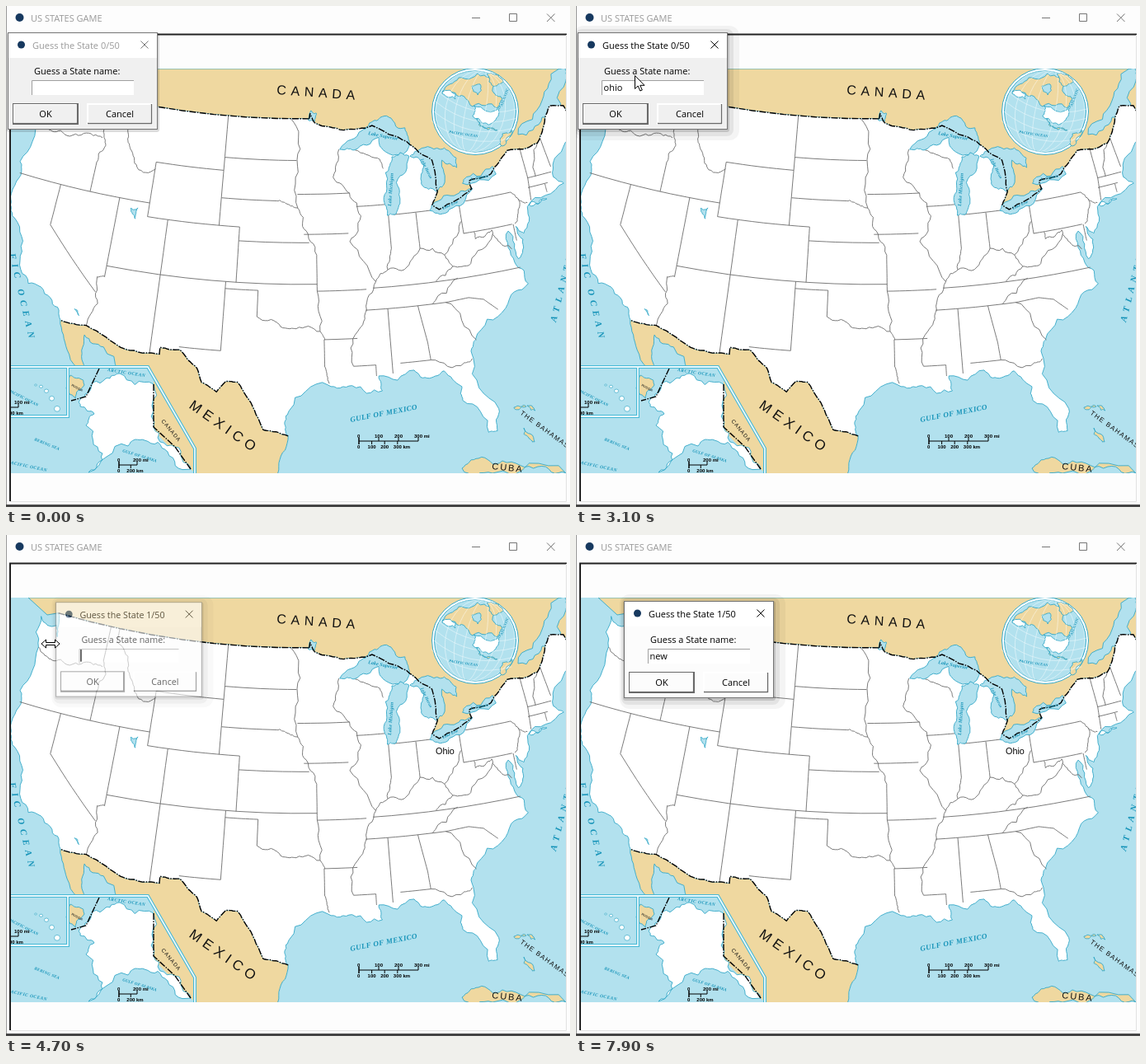
Write an HTML page that moves like this. It is 684 px wide and 608 px high and loops after 8 s.

```html
<!DOCTYPE html>
<html lang="en">
<head>
<meta charset="utf-8">
<title>US States Game</title>
<style>
html, body { margin: 0; width: 100%; height: 100%; overflow: hidden; background: #fff; }
svg { display: block; width: 684px; height: 608px; }
text { white-space: pre; }
.ui { font: 11px "Open Sans", "Noto Sans", sans-serif; }
.sea { font-family: "Liberation Serif", serif; font-style: italic; font-weight: bold; fill: #1593b8; }
.land { font-family: "Liberation Sans", sans-serif; fill: #111; }
.bar { font: bold 6px "Liberation Sans", sans-serif; }
.line { fill: none; stroke: #6d6d6d; stroke-width: .9; stroke-linejoin: round; }
.coast { fill: none; stroke: #35a9c8; stroke-width: .9; }
.frontier { fill: none; stroke: #000; stroke-width: 1.4; stroke-dasharray: 8 1.5 1.5 1.5; }
</style>
</head>
<body>
<svg id="stage" viewBox="0 0 684 608"></svg>
<script>
const WATER = "#b2e1ee", TAN = "#efd8a0", WHITE = "#fff";

let seed = 7;
const random = () => (seed = (seed * 16807) % 2147483647) / 2147483647 - .5;

// Albers equal-area conic: degrees west and north to stage pixels.
const RAD = Math.PI / 180, [SOUTH, NORTH] = [29.5 * RAD, 45.5 * RAD];
const CONE = (Math.sin(SOUTH) + Math.sin(NORTH)) / 2;
const CURVE = Math.cos(SOUTH) ** 2 + 2 * CONE * Math.sin(SOUTH);
function project([west, lat]) {
  const radius = 956 * Math.sqrt(CURVE - 2 * CONE * Math.sin(lat * RAD)) / CONE;
  const turn = CONE * (96 - west) * RAD;
  return [358.8 + radius * Math.sin(turn), -916.5 + radius * Math.cos(turn)];
}

// Midpoint displacement turns a few key points into a natural line.
function rough(text, amount = .35, levels = 3) {
  let points = text.trim().split(/\s+/).map(p => p.split(",").map(Number));
  while (levels--) {
    points = points.flatMap(([bx, by], i) => {
      if (!i) return [[bx, by]];
      const [ax, ay] = points[i - 1], push = random() * amount;
      return [[(ax + bx) / 2 - (by - ay) * push, (ay + by) / 2 + (bx - ax) * push], [bx, by]];
    });
  }
  return points;
}

const join = points => points.map(p => p.map(v => v.toFixed(1)).join()).join(" ");
const geo = (text, amount) => join(rough(text, amount).map(project));
const closed = text => text + " " + text.split(" ")[0];
const open = (points, cls) => `<polyline points="${points}" class="${cls}"/>`;
const area = (points, fill, stroke = "none") =>
  `<polygon points="${points}" fill="${fill}" stroke="${stroke}" stroke-width=".9"/>`;
const lake = text => area(geo(closed(text)), WATER, "#35a9c8");
const island = (text, fill = TAN) => area(join(rough(closed(text), .5)), fill, "#35a9c8");
const rect = (x, y, w, h, fill, extra = "") =>
  `<rect x="${x}" y="${y}" width="${w}" height="${h}" fill="${fill}" ${extra}/>`;
const label = (cls, text, x, y, turn, size, gap = 0) =>
  `<text class="${cls}" font-size="${size}" letter-spacing="${gap}" transform="translate(${x} ${y}) rotate(${turn})">${text}</text>`;

function scaleBar(x, y, width, ticks, step) {
  let out = `<path d="M${x} ${y}h${width}M${x} ${y - 4}v8" stroke="#000" fill="none"/>`;
  for (let i = 0; i <= ticks; i++) {
    for (const [unit, ratio, side, drop] of [["mi", 1, -4, -4], ["km", .65, 4, 9]]) {
      const at = x + width * ratio * i / ticks;
      out += `<path d="M${at} ${y}v${side}" stroke="#000"/>` +
        `<text class="bar" x="${at - (i ? 5 : 2)}" y="${y + drop}">${i * step}${i === ticks ? " " + unit : ""}</text>`;
    }
  }
  return out;
}

// Key points of shores and frontiers, in degrees west and north.
const outline = {
  parallel49: geo("123,49 95.2,49", 0),
  north: geo("95.2,49 95.1,49.4 94.6,48.7 91.5,48.1 88.4,48.3 84.9,46.9 82.5,45.3 82.4,43 83.1,42.1 82.5,41.7 79,42.8 79.1,43.4 76.8,43.6 74.7,45 71.5,45 70.3,46.2 69.2,47.4 67.8,47.1 67,44.8", .12),
  east: geo("67,44.8 70.2,43.6 70.8,42.3 70,41.7 74,40.7 74.9,38.9 75.5,39.5 75.1,38.5 75.9,37.2 76.3,39.3 76.3,37 75.5,35.3 77.9,33.9 81,32 81.4,30.7 80,26.8 80.4,25.2"),
  gulf: geo("80.4,25.2 81.1,25.2 82.8,27.8 82.7,28.8 84,30.1 85.3,29.7 86.5,30.4 89.5,30.2 89.3,29.1 91.8,29.6 93.8,29.7 97,27.9 97.4,27 97.1,26"),
  south: geo("97.1,26 99.1,26.4 100.4,28.6 101.4,29.8 102.4,29.8 103.1,29 104.4,29.6 104.9,30.6 106.5,31.8 108.2,31.8 108.2,31.3 111.1,31.3 114.8,32.5 117.1,32.5", .1),
  west: geo("117.1,32.5 118.4,33.9 120.6,34.5 121.9,36.6 123.7,38.9 124.4,40.4 124.1,41.7 124.5,42.8 124,46.2 124.7,48.4 122.8,48.1 122.4,47.3 123,49")
};

// Surveyed borders follow meridians and parallels; the projection bends them.
const parallels = [
  [42, 124.2, 111.05], [45, 111.05, 104.05], [41, 111.05, 102.05], [37, 114.05, 94.6], [36.5, 103, 100],
  [32, 106.6, 103], [45.95, 104.05, 96.55], [43, 104.05, 98.5], [40, 102.05, 95.3], [43.5, 96.45, 91.2],
  [40.6, 95.8, 91.5], [36.5, 94.6, 90.1], [33, 94.05, 91.15], [31, 91.6, 89.7], [42.5, 90.6, 87.8],
  [41.72, 87, 83.4], [39.72, 80.5, 75.8], [42, 79.8, 75.3], [42.73, 73.3, 70.9], [42.04, 73.5, 71.5],
  [36.56, 89.5, 75.9], [35, 90.3, 83.1], [31, 87.6, 85]
];
const meridians = [
  [120, 42, 39], [117.03, 49, 46.4], [117.03, 44.2, 42], [116.05, 49, 48], [114.05, 42, 36.2], [111.05, 45, 41],
  [109.05, 41, 31.33], [104.05, 49, 41], [103, 37, 32], [102.05, 41, 37], [100, 36.5, 34.6], [94.6, 39.1, 36.5],
  [94.05, 33, 31], [89.7, 31, 30.2], [88.3, 35, 30.3], [87.5, 41.7, 39.3], [84.8, 41.7, 39.1], [80.5, 42, 39.7],
  [75.7, 39.7, 38.5], [71.8, 42, 41.4]
];
const rivers = [
  "124,46.2 122.8,45.7 121.2,45.7 119,46 117,46", "117,46.4 116.5,45.5 117,44.2",
  "116,48 114.4,46.6 113.9,45.6 112.9,44.4 111,44.5", "114,36.2 114.7,36.1 114.2,34.2 114.8,32.5",
  "97.2,49 96.5,46 96.4,42.5 95.8,41 94.6,39.1", "98.5,43 97.5,42.8 96.4,42.5", "94.6,36.5 94.4,33.6 94,33", "94,31 93.7,29.8",
  "100,34.6 98,34.1 96.5,33.8 94.4,33.6",
  "92.1,46.7 92.8,44.7 91.2,43.5 90.2,41.8 91.4,40 89.2,37 90.2,35 91.1,33.5 91.6,31",
  "90.4,46.6 88.1,45.9 87.6,45.1", "87.5,39.3 88,37.8",
  "89.2,37 88,37.8 86,38 84.8,39.1 82.6,38.4 80.6,40.6", "75.3,42 74.7,41.4 75,40.4 75.5,39.7", "74.7,41.4 73.9,41",
  "71.5,45 72.5,42.7", "79.5,39.7 79.5,39.2 77.8,39.6 77.2,38.5 76.3,38", "77.8,39.3 80.3,37.5 82,37.5 82.6,38.4",
  "82,37.5 83.7,36.6", "81.7,36.6 84.3,35", "83.1,35 80.9,32", "85,31 82.2,30.5 81.5,30.7"
];
const slants = [
  "120,39 114.6,35", "73.4,45 73.3,42.7 73.5,41.1", "71.1,45.3 70.8,43.1", "85.6,35 85.1,32.3 85,31",
  "83.1,35 81,35.1 79.7,34.8 78.6,33.9"
];
const lakes = [
  "92,46.7 89.5,48 88.3,48.6 86.5,48.8 84.9,47.9 84.7,46.5 87.5,46.5 87.8,47.4 90.5,46.6",
  "87.6,41.7 87.8,43 87.4,44.8 86.6,45.9 84.8,45.8 86.4,44 86.2,42.8 86.9,41.7",
  "84.7,45.8 83.4,45 83.9,43.7 82.5,43 81.7,43.4 81.5,45.2 80.1,44.5 80,45.2 81.5,46 84,46.1",
  "83.4,41.7 81.5,41.6 78.9,42.8 80.5,42.6 83.1,42.1", "79.8,43.3 76.3,43.5 76.5,44.1 79.3,43.7",
  "112.8,41.4 112.1,41.5 112.2,40.7", "95.3,48.9 95,49.6 94.4,49.4 94.6,48.8", "116.1,33.5 115.8,33.4 115.6,33.1"
];

function alaska() {
  let hawaii = "";
  for (let i = 0; i < 5; i++) {
    hawaii += `<ellipse cx="${36 + i * 6.5}" cy="${460 + i * i * 1.8}" rx="${1.5 + i * .5}" ry="${1 + i * .6}" fill="#fff" stroke="#35a9c8" stroke-width=".7"/>`;
  }
  const boxes = "M6 438H172L229 537V567M75 438V498H6";
  return area("75,438 172,438 229,537 229,567 6,567 6,498 75,498", WATER) +
    area("179,455 184,458 229,537 229,567 179,515", TAN) + island("78,448 95,460 84,476 78,472") +
    island("96,471 121,452 138,446 179,459 179,511 205,535 224,562 196,541 168,527 148,534 100,566 117,543 97,509 107,495 90,486", WHITE) +
    open("179,459 179,511 205,535 224,562", "frontier") + open("113,440 97,474 79,479", "frontier") +
    `<path d="${boxes}" fill="none" stroke="#48b9d6" stroke-width="4"/><path d="${boxes}" fill="none" stroke="#e9f8fb" stroke-width="1.8"/>` +
    hawaii +
    label("sea", "ARCTIC OCEAN", 123, 443, 9, 5.5, .5) + label("sea", "BERING SEA", 34, 527, 22, 5, .3) +
    label("sea", "GULF OF ALASKA", 141, 541, 17, 5, .1) + label("sea", "PACIFIC OCEAN", 2, 555, 12, 5.5, .5) +
    label("sea", "PACIFIC OCEAN", 3, 468, 27, 5, .1) +
    label("land", "CANADA", 188, 504, 50, 6.5, 1) + label("land", "RUSSIA", 79, 461, 28, 4) +
    scaleBar(137, 557, 22, 1, 200) + scaleBar(-12, 487, 27, 1, 100);
}

function globe() {
  let grid = "";
  for (let r = 12; r < 50; r += 12) {
    grid += `<ellipse rx="${r}" ry="50"/><path d="M-50 ${r - 26}Q0 ${r} 50 ${r - 26}"/>`;
  }
  return `<circle cx="569" cy="128" r="52.5" fill="#fff" stroke="#35a9c8"/>
    <circle cx="569" cy="128" r="49.5" fill="${WATER}" stroke="#35a9c8"/>` +
    island("529,104 549,87 580,84 592,106 602,112 596,124 566,122 546,108") + island("583,83 594,83 603,92 594,97") +
    island("565,97 575,95 572,108", WATER) + island("567,121 599,121 592,140 566,134", WHITE) +
    island("529,106 540,104 545,113", WHITE) + island("571,137 588,148 596,151 580,148") + island("602,155 614,151 602,170") +
    `<g transform="translate(569 128) rotate(12)" fill="none" stroke="#fff" stroke-width=".6" opacity=".7">${grid}</g>` +
    label("sea", "PACIFIC OCEAN", 537, 154, 9, 4.5, .1) + label("sea", "ATLANTIC", 602, 122, -70, 4.5, .1);
}

function map() {
  const { parallel49, north, east, gulf, south, west } = outline;
  const surveyed = [
    ...parallels.map(([lat, from, to]) => `${from},${lat} ${to},${lat}`),
    ...meridians.map(([lon, from, to]) => `${lon},${from} ${lon},${to}`), ...slants
  ];
  return rect(6, 76, 673, 491, WATER) +
    area(`${parallel49} ${north} 700,76 27,76 50,97`, TAN, "#35a9c8") +
    island("621,156 650,115 671,76 679,76 679,91 650,135", WATER) +
    area(`${south} ${geo("117.1,32.5 116,30.5 114,28 112,22 97.7,22 97.8,24 97.1,26", .2)}`, TAN, "#35a9c8") +
    lake("114.8,31.8 113,31.2 111,27.5 112.5,27.5 114.6,30") +
    area(Object.values(outline).join(" "), WHITE) +
    [east, gulf, west].map(p => open(p, "coast")).join("") +
    surveyed.map(p => open(geo(p, 0), "line")).join("") + rivers.map(p => open(geo(p), "line")).join("") +
    lakes.map(lake).join("") + island("634,241 656,234 646,240", WHITE) +
    [parallel49, north, south].map(p => open(p, "frontier")).join("") +
    label("land", "CANADA", 328, 107, 4, 16, 5.7) + label("land", "MEXICO", 221, 487, 35, 17, 5.4) +
    label("sea", "GULF OF MEXICO", 418, 505, -11, 9, .4) + label("sea", "ATLANTIC", 667, 384, -76, 11, 5.5) +
    label("sea", "FIC OCEAN", 4, 301, 77, 11, 5.7) + label("sea", "Lake Superior", 439, 156, 11, 6, .1) +
    label("sea", "Lake Michigan", 467, 243, -86, 6, .2) + label("sea", "Lake Huron", 503, 186, 65, 5, .1) +
    label("sea", "Lake Erie", 530, 247, -24, 5) + label("sea", "L. Ontario", 564, 212, -12, 5) +
    island("553,561 573,549 602,552 645,559 679,567 590,567") + island("628,512 641,529 634,524") +
    island("616,487 631,486 621,490") + island("632,485 642,491 636,490") +
    label("land", "THE BAHAMAS", 623, 495, 36, 8, 1.3) + label("land", "CUBA", 589, 562, 6, 11, 2) +
    scaleBar(428, 528, 72, 3, 100) + globe() + alaska();
}

// Tk-style raised button; the default one carries a dark frame.
function button(x, text, isDefault) {
  return `<g class="${isDefault ? "ok" : "cancel"}">` + rect(x, 85, 80, 26, isDefault ? "#686868" : "#fff") +
    (isDefault ? rect(x + 1, 86, 78, 24, "#fff") : "") +
    `<path class="bevel" d="M${x + 78.5} 86V109.5H${x + 1}" fill="none" stroke="#696969" stroke-width="1.4"/>` +
    rect(x + 2, 87, 75.5, 21.5, "var(--face)") +
    `<text class="ui face" x="${x + 40}" y="102" text-anchor="middle">${text}</text></g>`;
}

function dialog(id, x, y, title, face) {
  return `<g id="${id}" style="--face:${face}"><g transform="translate(${x} ${y})">
    <g class="shadow">${rect(-6, -9, 201, 139, "#000", 'rx="12" opacity=".045"')}${rect(-4, -5, 192, 130, "#000", 'rx="8" opacity=".07"')}</g>
    ${rect(-2, -1, 185, 121, "#000", 'rx="3" opacity=".14"')}
    ${rect(-.5, -.5, 181, 117, face, 'stroke="#747474"')}${rect(0, 0, 180, 30, "#fff")}
    <circle cx="15.5" cy="14" r="4.5" fill="#17395f"/>
    <text class="ui title" x="29" y="19">${title}</text>
    <path class="close" d="M160.5 9.5l9 9m0 -9l-9 9" stroke="#000"/>
    <text class="ui" x="31" y="50">Guess a State name:</text>
    ${rect(28, 57, 124, 18, "#fff")}<path d="M28.5 75V57.5H152" fill="none" stroke="#a0a0a0"/>
    <text class="ui entry" x="30.5" y="70"></text>${rect(29.5, 58, 2, 15, "#000", 'class="caret"')}
    ${button(5, "OK", true)}${button(95, "Cancel", false)}</g></g>`;
}

const stage = document.getElementById("stage");
stage.innerHTML = `<clipPath id="frame"><rect x="6" y="76" width="673" height="491"/></clipPath>
  ${rect(0, 0, 684, 608, "#fdfdfd")}${rect(0, 0, 1, 605, "#999")}
  <circle cx="16.5" cy="14" r="5" fill="#17395f"/>
  <text id="heading" class="ui" x="30" y="18.5">US STATES GAME</text>
  <path id="controls" fill="none" d="M565 14.5h10M610.5 9.5h9v9h-9zM656 9.5l9.5 9.5m0 -9.5l-9.5 9.5"/>
  <path d="M5 601V34.5H680" fill="none" stroke="#222" stroke-width="2"/>
  <path d="M679.5 35V601.5H5" fill="none" stroke="#e2e2e2"/>
  ${rect(0, 605, 684, 3, "#444")}
  <g clip-path="url(#frame)">${map()}</g>
  <path id="turtle" d="M347 321.5L337 316.5L339.5 321.5L337 326.5Z"/>
  <text id="answer" x="521" y="266" font-family="Liberation Sans, sans-serif" font-size="10.8">Ohio</text>
  ${dialog("first", 3, 33, "Guess the State 0/50", "#f0f0f0")}
  ${dialog("second", 59, 81, "Guess the State 1/50", "#fcfcfc")}
  <g id="pointer">
    <path class="arrow" d="M.5 .5V16.5L4.2 13L6.8 19L9.3 18L6.8 12.3H12Z" fill="#fff" stroke="#000"/>
    <path class="beam" d="M-3 -5h2l1 1l1 -1h2M0 -4V5M-3 6h2l1 -1l1 1h2" fill="none" stroke="#ddd"/>
    <path class="resize" d="M-11 0L-5.5 -5V-1.5H5.5V-5L11 0L5.5 5V1.5H-5.5V5Z" fill="#fff" stroke="#000"/>
  </g>`;

const $ = selector => stage.querySelector(selector);
const show = (node, on) => node.setAttribute("visibility", on ? "visible" : "hidden");
const clamp = v => Math.max(0, Math.min(1, v));
const within = (t, from, to) => t >= from && t < to;

const entries = {
  first: { word: "ohio", keys: [1500, 1800, 1800, 1900], blinkFrom: -200 },
  second: { word: "new", keys: [7400, 7500, 7600], blinkFrom: 4600 }
};
const strokes = [
  { kind: "beam", start: 100, end: 900, from: [66, 97], to: [66, 97] },
  { kind: "arrow", start: 2800, end: 3100, from: [71, 84], to: [71, 84] },
  { kind: "arrow", start: 3100, end: 3400, from: [71, 84], to: [54, 137] },
  { kind: "arrow", start: 3400, end: 4500, from: [54, 137], to: [54, 130] },
  { kind: "resize", start: 4500, end: 5200, from: [54, 132], to: [54, 132] },
  { kind: "arrow", start: 5200, end: 5600, from: [58, 132], to: [69, 135] },
  { kind: "beam", start: 5600, end: 5900, from: [76, 144], to: [92, 146] }
];

function updateEntry(id, t) {
  const { word, keys, blinkFrom } = entries[id], entry = $(`#${id} .entry`), caret = $(`#${id} .caret`);
  const count = keys.filter(at => t >= at).length;
  entry.textContent = word.slice(0, count);
  caret.setAttribute("x", 30.5 + (count ? entry.getComputedTextLength() : -1));
  show(caret, t >= 100 && (t - blinkFrom) % 900 < 600);
}

function updatePointer(t) {
  const stroke = strokes.find(({ start, end }) => within(t, start, end));
  for (const kind of ["arrow", "beam", "resize"]) show($(`#pointer .${kind}`), stroke && stroke.kind === kind);
  if (!stroke) return;
  const { start, end, from, to } = stroke;
  const spot = from.map((v, i) => Math.round(v + (to[i] - v) * (t - start) / (end - start)));
  $("#pointer").setAttribute("transform", `translate(${spot})`);
}

function render(time) {
  const t = Math.floor(time % 8000 / 100) * 100;
  const mainActive = within(t, 4000, 4600), firstActive = t >= 100, pressed = within(t, 4000, 4400);
  $("#heading").setAttribute("fill", mainActive ? "#000" : "#999");
  $("#controls").setAttribute("stroke", mainActive ? "#000" : "#777");
  show($("#turtle"), pressed);
  show($("#answer"), t >= 4400);

  $("#first").style.display = t < 4400 ? "" : "none";
  $("#first .title").setAttribute("fill", firstActive ? "#000" : "#999");
  $("#first .close").setAttribute("stroke", firstActive ? "#000" : "#777");
  $("#first .shadow").setAttribute("opacity", clamp(t / 200));
  $("#first .ok .face").setAttribute("transform", pressed ? "translate(1 1)" : "");
  $("#first .ok .bevel").setAttribute("transform", pressed ? "rotate(180 45 98)" : "");

  const fade = clamp((t - 4400) / 500), scale = .94 + .06 * fade;
  $("#second").style.display = fade ? "" : "none";
  $("#second").setAttribute("opacity", fade);
  $("#second").setAttribute("transform", `translate(149 139) scale(${scale}) translate(-149 -139)`);

  updateEntry("first", t);
  updateEntry("second", t);
  updatePointer(t);
}

const began = performance.now();
function tick() {
  render(performance.now() - began);
  requestAnimationFrame(tick);
}
tick();
</script>
</body>
</html>
```
